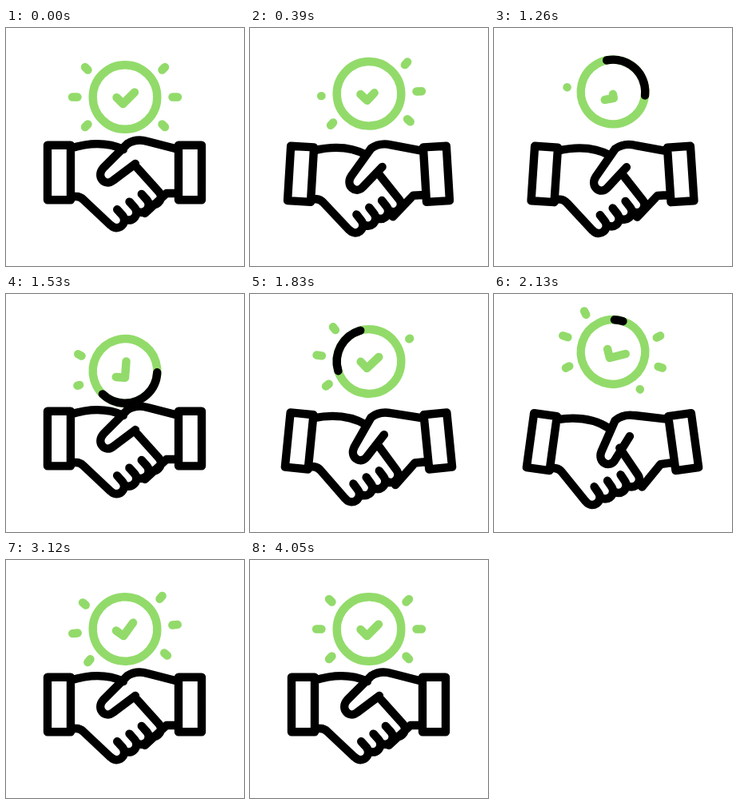
Recreate the animation shown at these times as an HTML page with a canvas. Size 298 by 298 pixels, loop 5.4 s.

```html
<!DOCTYPE html>
<html lang="en">
<head>
<meta charset="utf-8">
<title>Handshake</title>
<style>
html, body { margin: 0; width: 100%; height: 100%; overflow: hidden; background: #fff; }
canvas { display: block; width: 100vmin; height: 100vmin; }
</style>
</head>
<body>
<canvas id="stage"></canvas>
<script>
const SIZE = 298, LOOP = 5400, STEP = 30, END = 4050;
const GREEN = '#92db6a', BLACK = '#000', STROKE = 10.4;
const AXIS = 148.5;
const canvas = document.getElementById('stage');
const ctx = canvas.getContext('2d');
const rad = deg => deg * Math.PI / 180;
const clamp = v => Math.min(1, Math.max(0, v));

// Eased 0 to 1 between two times.
const ease = (t, from, to) => (1 - Math.cos(Math.PI * clamp((t - from) / (to - from)))) / 2;

const shake = t => ease(t, 0, 870) - ease(t, 930, 1560) + ease(t, 1530, 2010) - ease(t, 2010, 2880);
const sunLift = t => -30 * ease(t, 180, 1040) + 40 * ease(t, 960, 1500)
  - 24 * ease(t, 1530, 2130) + 14 * ease(t, 2130, 2900);
const sunTurn = t => -31 * ease(t, 200, 1200) + 49 * ease(t, 1200, 2120)
  - 23 * ease(t, 2120, 3000) + 5 * ease(t, 3000, 4020);
// The tick swings wider than the rays and a little later.
const tickTurn = t => 1.8 * sunTurn(t - 80);
const tickLength = t => 1 - ease(t, 60, 1100) + ease(t, 980, 1530);

// Runs a drawing turned about a pivot and shifted.
function pose(x, y, deg, dx, dy, body) {
  ctx.save();
  ctx.translate(x + dx, y + dy);
  ctx.rotate(rad(deg));
  ctx.translate(-x, -y);
  body();
  ctx.restore();
}

function segment(x0, y0, x1, y1) {
  ctx.moveTo(x0, y0);
  ctx.lineTo(x1, y1);
}

function drawRays(t) {
  ctx.beginPath();
  for (let i = 0; i < 6; i++) {
    const side = i < 3 ? -1 : 1, row = i % 3 - 1;
    const out = 30 + i * 160, back = 1220 + i * 172;
    const shown = t < 1200 ? 1 - ease(t, out, out + 240) : ease(t, back, back + 300);
    if (shown === 0) continue;
    const x = row ? 46.5 : 59.5, y = row * 34;
    const dx = row ? 3.5 : 6.5, dy = row * 3.5;
    segment(side * x, y, side * (x + dx * shown), y + dy * shown);
  }
  ctx.stroke();
}

function drawTick(t) {
  const short = 11.3, long = 20.5;
  const drawn = tickLength(t) * (short + long);
  if (drawn < 0.01) return;
  ctx.save();
  ctx.translate(-1.5, 5);
  ctx.rotate(rad(tickTurn(t)));
  ctx.translate(-1, 3.5);
  ctx.rotate(rad(-45));
  ctx.beginPath();
  segment(0, -short, 0, Math.min(0, drawn - short));
  if (drawn > short) ctx.lineTo(drawn - short, 0);
  ctx.stroke();
  ctx.restore();
}

function ring(color, from, to) {
  ctx.strokeStyle = color;
  ctx.beginPath();
  ctx.arc(0, 0, 40.3, rad(from - 90), rad(to - 90));
  ctx.stroke();
}

function drawSun(t) {
  ctx.save();
  ctx.translate(149, 86.5 + sunLift(t));
  ctx.strokeStyle = GREEN;
  drawTick(t);
  ctx.rotate(rad(sunTurn(t)));
  drawRays(t);
  ring(GREEN, 0, 360);
  const tail = 360 * ease(t, 1080, 2290), head = 360 * ease(t, 730, 2040);
  if (head - tail > 0.1) ring(BLACK, tail, head);
  ctx.restore();
}

function sleeve(side, p) {
  const x = AXIS + side * 82, y = 181;
  pose(x, y, -side * 8.2 * p, side * 7 * p, 4.3 * p, () => ctx.rect(x - 14.5, y - 34.3, 29, 68.6));
}

function leftHand() {
  ctx.moveTo(81, 150.5);
  ctx.quadraticCurveTo(119, 139, 147, 152);

  ctx.moveTo(81, 211);
  ctx.lineTo(88, 211);
  ctx.quadraticCurveTo(93, 211, 97, 215);
  ctx.lineTo(131, 247);

  // Four equal fingertips; the last one has a long knuckle line.
  const r = 9.5;
  for (let i = 0; i < 4; i++) {
    ctx.save();
    ctx.translate(138.5 + 15.3 * i, 240.7 - 9.7 * i);
    ctx.rotate(rad(48));
    ctx.moveTo(i < 3 ? -9.5 : -41, -r);
    ctx.arc(0, 0, r, rad(-90), rad(i ? 62 : 90));
    ctx.restore();
  }
}

function rightHand(p) {
  segment(216, 207, 201, 207);
  ctx.lineTo(174, 232);

  ctx.moveTo(216, 152);
  ctx.lineTo(177, 142);
  ctx.quadraticCurveTo(163, 138, 152, 145);
  // The thumb bends further about its knuckle.
  pose(152, 145, -14 * p, 0, 0, () => {
    ctx.lineTo(122, 175);
    ctx.bezierCurveTo(112, 186, 124, 199, 134, 191);
    ctx.lineTo(162, 170);
  });
}

function drawHands(t) {
  const p = shake(t);
  ctx.strokeStyle = BLACK;
  ctx.beginPath();
  sleeve(-1, p);
  sleeve(1, p);
  pose(AXIS - 82, 181, 8.2 * p, -7 * p, 4.8 * p, leftHand);
  pose(AXIS + 82, 181, -8.2 * p, 4 * p, 2.5 * p, () => rightHand(p));
  ctx.stroke();
}

function draw(now) {
  const t = Math.min(END, Math.floor(now % LOOP / STEP) * STEP);
  const side = Math.round(Math.min(innerWidth, innerHeight) * (devicePixelRatio || 1)) || SIZE;
  if (canvas.width !== side) canvas.width = canvas.height = side;
  ctx.setTransform(side / SIZE, 0, 0, side / SIZE, 0, 0);
  ctx.fillStyle = '#fff';
  ctx.fillRect(0, 0, SIZE, SIZE);
  ctx.lineCap = ctx.lineJoin = 'round';
  ctx.lineWidth = STROKE;
  drawSun(t);
  drawHands(t);
}

const start = performance.now();
function tick() {
  draw(performance.now() - start);
  requestAnimationFrame(tick);
}
tick();
</script>
</body>
</html>
```
